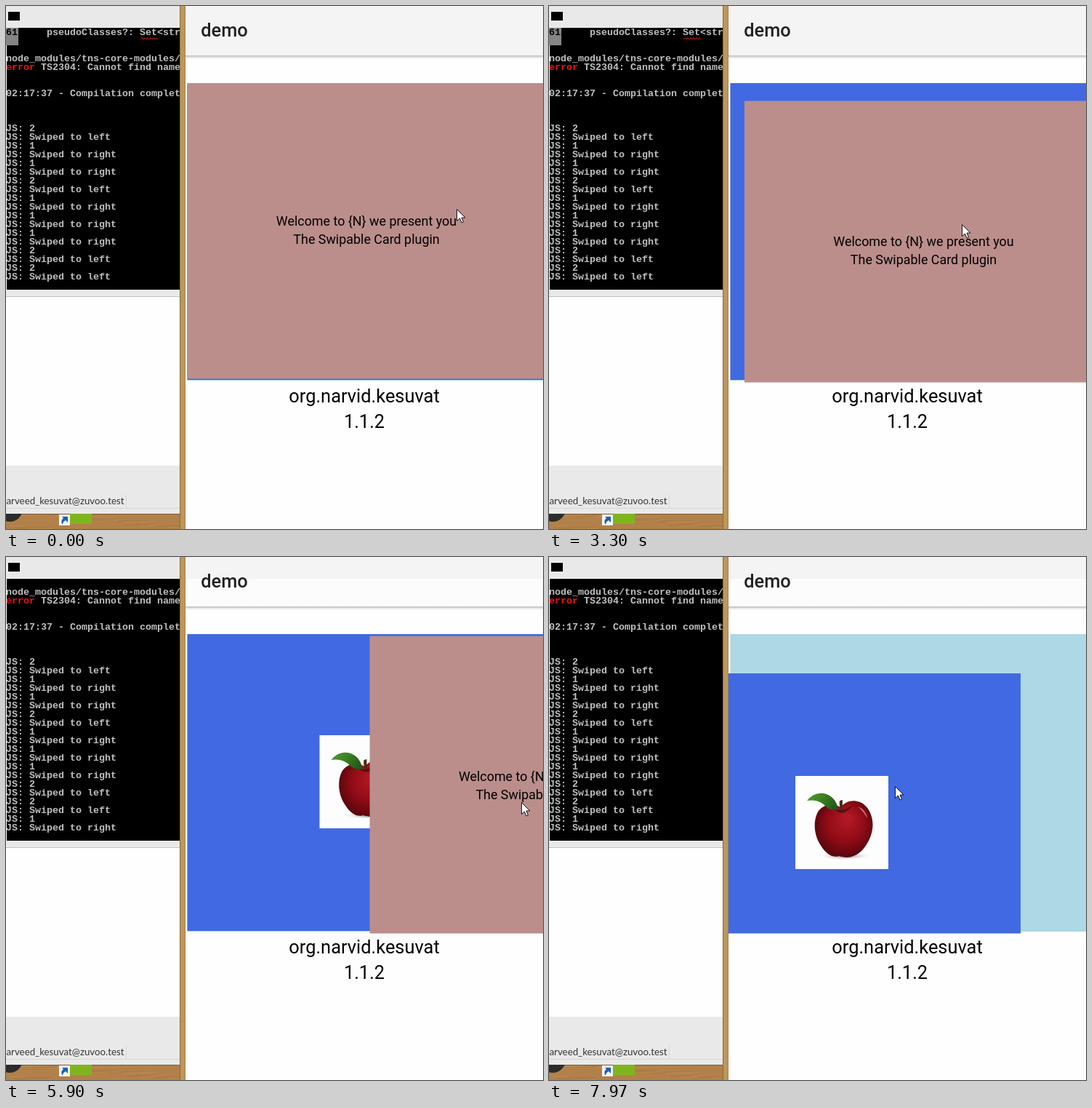
An HTML page with a canvas that plays this animation: 739 by 719 pixels, repeating every 8 s.

```html
<!DOCTYPE html>
<html lang="en">
<head>
<meta charset="utf-8">
<title>Swipable card demo</title>
<style>
html, body { margin: 0; width: 100%; height: 100%; overflow: hidden; background: #fefefe; }
canvas { display: block; }
</style>
</head>
<body>
<canvas id="stage" width="739" height="719"></canvas>
<script>
const ctx = document.getElementById('stage').getContext('2d');
const LOOP = 8000;
const STEP = 130;      // the screen refreshes about this often while something moves
const SWIPED = 5900;   // the console reports the swipe
const REMOVED = 6210;  // the first card is gone and the next one can be dragged

// Each move glides the pointer to a place and the top card to an offset.
const rest = { pointer: [620, 279], card: [0, 0] };
const moves = [
  { from: 0, to: 250, pointer: [624, 213] },
  { from: 530, to: 800, pointer: [651, 209] },
  { from: 1330, to: 1610, pointer: [491, 185] },
  { from: 1780, to: 2510, pointer: [567, 298], card: [24, 101] },
  { from: 2900, to: 3300, pointer: [568, 300], card: [19.5, 28] },
  { from: 3300, to: 4540, pointer: [510, 352], card: [111, 36] },
  { from: 4540, to: 5210, pointer: [530, 354], card: [105, 24] },
  { from: 5210, to: 6060, pointer: [780, 330], card: [309.5, -1] },
  { from: REMOVED, to: REMOVED, card: [0, 0] },
  { from: 6750, to: 7600, pointer: [567, 259] },
  { from: 7600, to: 7970, pointer: [476, 315], card: [-92.5, 56] }
];

function poseAt(t) {
  let pose = rest;
  for (const { from, to, ...goal } of moves) {
    if (t < from) break;
    const steps = Math.max(1, Math.round((to - from) / STEP));
    const k = t >= to ? 1 : Math.floor((t - from) / (to - from) * steps) / steps;
    const mix = name => pose[name].map((v, i) => v + ((goal[name] ?? pose[name])[i] - v) * k);
    pose = { pointer: mix('pointer'), card: mix('card') };
  }
  return pose;
}

function rect(color, x, y, w, h) {
  ctx.fillStyle = color;
  ctx.fillRect(x, y, w, h);
}

function text(value, x, y, font, color = '#000', align = 'left') {
  ctx.font = font;
  ctx.fillStyle = color;
  ctx.textAlign = align;
  ctx.fillText(value, x, y);
}

function fillPath(d, color) {
  ctx.fillStyle = color;
  ctx.fill(new Path2D(d));
}

function ramp(gradient, ...colors) {
  colors.forEach((color, i) => gradient.addColorStop(i / (colors.length - 1), color));
  return gradient;
}

function clipped(x, y, w, h, draw) {
  ctx.save();
  ctx.beginPath();
  ctx.rect(x, y, w, h);
  ctx.clip();
  draw();
  ctx.restore();
}

function drawConsole(swiped) {
  const mono = 'bold 13.333px "Liberation Mono", monospace';
  const line = (value, y, color = '#c0c0c0', x = 0) => text(value, x, y, mono, color);
  const swipes = swiped ? 'LRRLRRRLLR' : 'LRRLRRRLL';
  rect('#000', 1, 30, 238, 360);
  clipped(0, 30, 239, 360, () => {
    if (swiped) ctx.translate(0, -24);
    rect('#858585', 0, 30, 17, 24);
    line('61', 40, '#000');
    line('pseudoClasses?: Set<str', 40, '#c0c0c0', 56);
    ctx.strokeStyle = '#e01818';
    ctx.lineWidth = 1;
    ctx.beginPath();
    for (let i = 0; i <= 12; i++) ctx.lineTo(185 + i * 2, i % 2 ? 43.5 : 46);
    ctx.stroke();
    line('node_modules/tns-core-modules/', 76);
    line('error', 88, '#f01414');
    line('TS2304: Cannot find name', 88, '#c0c0c0', 48);
    line('02:17:37 - Compilation complet', 124);
    [...swipes].forEach((side, i) => {
      line('JS: ' + (side === 'L' ? 2 : 1), 172 + i * 24);
      line('JS: Swiped to ' + (side === 'L' ? 'left' : 'right'), 184 + i * 24);
    });
  });
}

function drawDesktop() {
  rect('#fefefe', 0, 0, 739, 719);
  rect('#e9e9e9', 0, 0, 239, 30);
  rect('#000', 3, 8, 16, 12);
  rect('#e9e9e9', 0, 390, 239, 9);
  rect('#c2c2c2', 0, 399, 239, 1);
  rect('#e9e9e9', 0, 632, 239, 66);
  rect('#d6d6d6', 0, 690, 239, 1);
  rect('#d6d6d6', 165, 672, 1, 18);
  text('arveed_kesuvat@zuvoo.test', 162.5, 685, '13.3px Lato, sans-serif', '#333', 'right');

  clipped(0, 698, 239, 21, () => {
    rect('#b2814a', 0, 698, 239, 21);
    for (let i = 0; i < 30; i++) {
      rect(i % 2 ? '#c4985f55' : '#8d602f44', (i * 83) % 230, 699 + (i * 7) % 20, 22 + i % 5 * 6, 1);
    }
    rect('#7a5c36', 0, 698, 239, 1);
    ctx.fillStyle = '#2c2c2c';
    ctx.beginPath();
    ctx.arc(5, 691, 18, 0, Math.PI * 2);
    ctx.fill();
    rect('#7fb51c', 88, 684, 30, 28);
    rect('#f4f4f4', 73, 699, 15, 15);
    fillPath('M77 702h8v8l-3-3q-4 2-4 6q-4-5 1-9z', '#1f5fa8');
  });

  rect('#bd965b', 239, 0, 8, 719);
  rect('#8c6c40', 239, 0, 1, 719);
  rect('#a47f4a', 246, 0, 1, 719);
}

function drawApp(swiped) {
  rect('#f4f4f4', 247, 0, 492, 68);
  if (swiped) rect('#fcfcfc', 247, 30, 492, 38);
  rect(ramp(ctx.createLinearGradient(0, 68, 0, 73), '#b8b8b8', '#e6e6e6', '#fefefe'), 247, 68, 492, 5);
  text('demo', 268.2, 42, '500 25.4px Roboto, sans-serif', '#212121');
  const font = '25.4px Roboto, sans-serif';
  text('org.narvid.kesuvat', 493, 545, font, '#000', 'center');
  text('1.1.2', 493, 580, font, '#000', 'center');
}

function drawApple() {
  rect('#fdfdfd', 0, 0, 128, 128);
  ctx.save();
  ctx.translate(68, 110);
  ctx.scale(1, 0.16);
  rect(ramp(ctx.createRadialGradient(0, 0, 2, 0, 0, 36), '#777', '#fdfdfd00'), -36, -36, 72, 72);
  ctx.restore();

  const skin = ramp(ctx.createRadialGradient(72, 58, 4, 67, 70, 46), '#b01824', '#920c17', '#4e050b');
  fillPath('M62 43C55 38 40 37 32 48C24 60 25 82 36 97C43 108 52 113 60 110C66 112 74 113 80 110C94 106 107 84 106.5 66C106 50 97 36 83 34.5C74 33.5 68 37 62 43Z', skin);
  fillPath('M50 44Q62 51 78 41Q70 53 60 50Z', '#5c0c14');
  fillPath('M86 42Q97 46 99 58Q93 48 86 42Z', '#cf6a72');
  fillPath('M62 46Q60 38 61 34L65 33Q64 39 66 46Z', '#4b2a16');
  const leaf = ramp(ctx.createLinearGradient(20, 25, 50, 48), '#4f9a2a', '#397d20', '#24591a');
  fillPath('M16 34Q27 20 43 25Q56 30 59 46Q47 49 39 39Q29 32 16 34Z', leaf);
}

function drawCards(t, offset) {
  const card = (color, y, [dx, dy], content) => {
    ctx.save();
    ctx.translate(249.5 + dx, y + dy);
    rect(color, 0, 0, 492, 410);
    content?.();
    ctx.restore();
  };
  const removed = t >= REMOVED;
  clipped(247, 106, 492, 411.5, () => {
    card('#add8e6', 105, rest.card);
    card('#4169e1', 104, removed ? offset : rest.card, () => {
      ctx.translate(182, 141);
      drawApple();
    });
    if (!removed) card('#bb8e8c', 102.5, offset, () => {
      const font = '17.9px Roboto, sans-serif';
      text('Welcome to {N} we present you', 246.5, 199.8, font, '#000', 'center');
      text('The Swipable Card plugin', 246.5, 224.2, font, '#000', 'center');
    });
  });
}

function drawPointer([x, y]) {
  ctx.save();
  ctx.translate(Math.round(x) + 0.5, Math.round(y) + 0.5);
  const arrow = new Path2D('M0 0V16L4 12.5L6.5 18.5L9 17.5L6.5 11.5H11.5Z');
  ctx.fillStyle = '#fff';
  ctx.fill(arrow);
  ctx.strokeStyle = '#111';
  ctx.lineWidth = 1;
  ctx.stroke(arrow);
  ctx.restore();
}

let start;
function frame(now) {
  start ??= now;
  const t = (now - start) % LOOP;
  const pose = poseAt(t + 0.01);
  const swiped = t >= SWIPED;
  drawDesktop();
  drawConsole(swiped);
  drawApp(swiped);
  drawCards(t + 0.01, pose.card);
  drawPointer(pose.pointer);
  requestAnimationFrame(frame);
}
requestAnimationFrame(frame);
</script>
</body>
</html>
```
